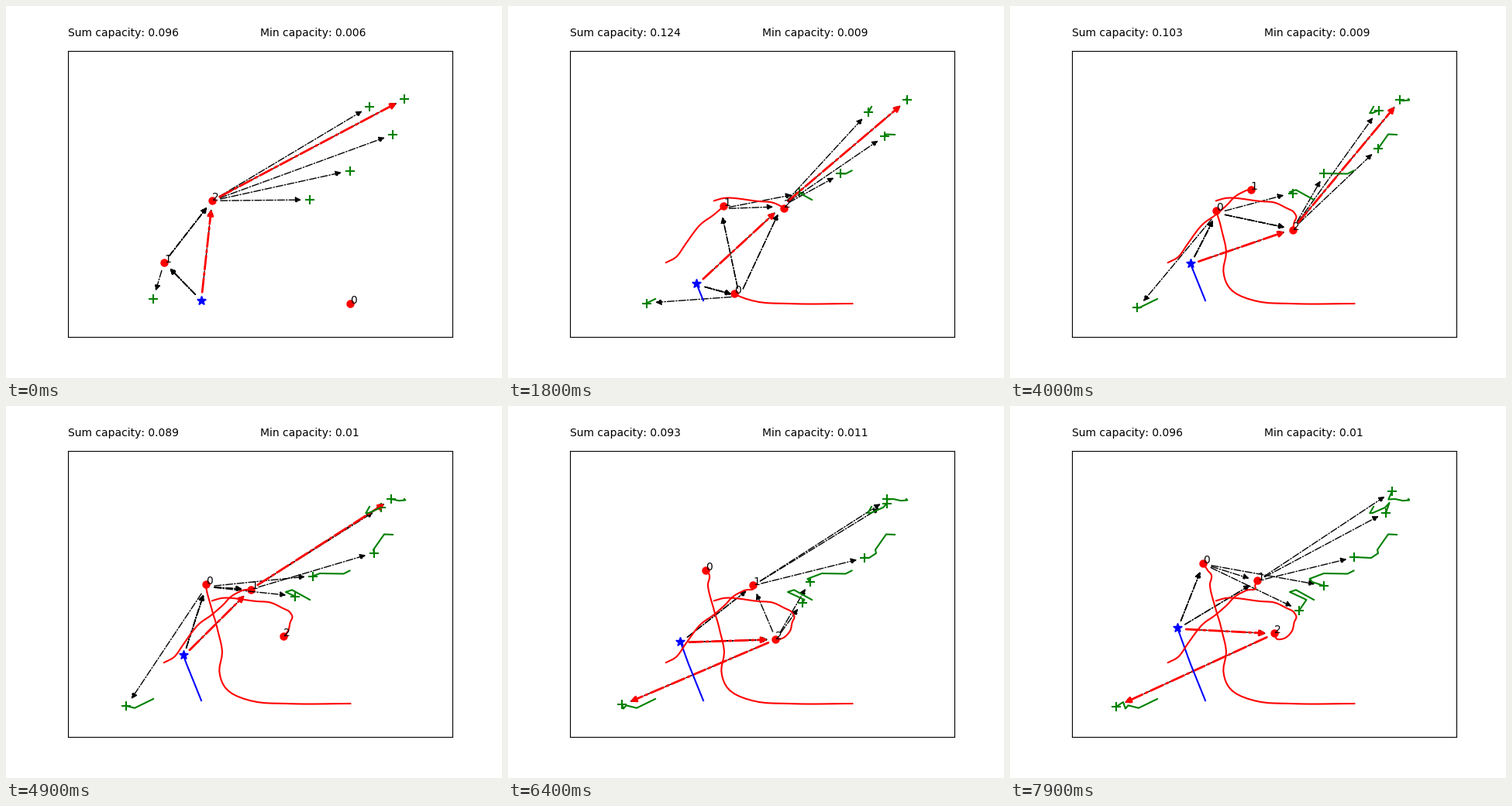
Write a matplotlib script that moves like this. It is 640 px wide and 480 px high and loops after 8 s.

```python
import numpy as np
import matplotlib.pyplot as plt
from matplotlib.animation import FuncAnimation
from matplotlib.patches import FancyArrowPatch

plt.rcParams["text.kerning_factor"] = 6

FRAMES, STEP_MS = 80, 100
T = np.arange(FRAMES)


def walk(*knots):
    """Straight legs between (time, x, y) waypoints."""
    t, x, y = np.array(knots, float).T
    return np.column_stack([np.interp(T, t, x), np.interp(T, t, y)])


def glide(*knots):
    """Cubic Hermite curve through (time, x, y) waypoints."""
    k = np.array(knots, float)
    t, p = k[:, 0], k[:, 1:]
    m = np.gradient(p, t, axis=0)
    i = np.clip(np.searchsorted(t, T, side="right") - 1, 0, len(t) - 2)
    h = (t[i + 1] - t[i])[:, None]
    u = (T - t[i])[:, None] / h
    ease = u * u * (3 - 2 * u)
    return (p[i] + ease * (p[i + 1] - p[i])
            + h * u * (1 - u) * ((1 - u) * m[i] - u * m[i + 1]))


# Pixels from the top left corner: base station, relays, users
paths = {
    "S": walk((0, 252, 380), (40, 232.6, 332), (79, 216, 286.3)),
    "0": glide((0, 444.3, 384), (10, 362.3, 384), (14, 324, 382), (18, 292, 371.3),
               (24, 275.3, 342), (28, 279, 317), (32, 273.2, 289.5), (40, 266, 264),
               (49, 258, 230.3), (53, 260, 222), (64, 255, 212), (79, 249, 203.3)),
    "1": glide((0, 204, 331), (3, 217.5, 323.5), (6, 228.5, 308), (10, 246, 284.3),
               (15, 266, 269), (18, 278.3, 258.3), (23, 288, 248), (32, 302, 239.3),
               (49, 316, 236.5), (64, 316.3, 231.3), (79, 319.3, 225.3)),
    "2": glide((0, 266, 251.3), (3, 279, 247.8), (10, 323, 252), (14, 341, 253.5),
               (18, 356.3, 260.5), (25, 367, 267), (28, 369.5, 272), (32, 367, 278.3),
               (40, 364.5, 289), (49, 358, 297.3), (64, 345.3, 301), (79, 341, 293.3)),
    "A": walk((0, 190, 378), (38, 166, 389.7), (51, 152.5, 386.3), (57, 149, 390.5),
              (68, 146, 382), (79, 137, 388)),
    "B": walk((0, 392, 250), (26, 369, 237.3), (36, 361, 240), (59, 382.5, 250),
              (79, 373, 264)),
    "C": walk((0, 443.5, 212.5), (12, 435.5, 216.5), (40, 405, 216),
              (58, 386.5, 223), (64, 390, 227), (79, 405, 232)),
    "D": walk((0, 499, 166), (14, 488, 165.5), (42, 474, 185.5), (49, 475, 190),
              (58, 466, 196), (79, 444, 195)),
    "E": walk((0, 469, 130), (20, 464.3, 138.3), (32, 468, 138), (49, 484, 131),
              (67, 489.5, 125), (79, 485, 138)),
    "F": walk((0, 514, 120), (20, 515.3, 121.5), (34, 507, 122.2), (49, 497, 120),
              (66, 488.3, 120.5), (79, 493, 110)),
}

# First step of a plan and its routes; the weakest route comes last
plans = [
    (0, "S1A S12B S12C S12D S12E S2F"),
    (6, "S1A S1B S12C S12D S02E S2F"),
    (14, "S0A S01B S012C S02D S02E S2F"),
    (25, "S0A S0B S02C S02D S02E S2F"),
    (41, "S0A S0B S0C S01D S01E S1F"),
    (57, "S2B S2C S21D S1E S1F S2A"),
    (72, "S0B S0C S01D S1E S1F S2A"),
]
key_t = [0, 10, 18, 32, 49, 64, 79]
total = np.interp(T, key_t, [.096, .1, .124, .116, .089, .093, .096])
least = np.interp(T, key_t, [.006, .008, .009, .009, .01, .011, .01])

fig, ax = plt.subplots(figsize=(6.4, 4.8), dpi=100)


def draw_route(route, i, color, width):
    for a, b in zip(route, route[1:]):
        ax.add_patch(FancyArrowPatch(
            paths[a][i], paths[b][i], arrowstyle="-|>", mutation_scale=11,
            shrinkA=7.8, shrinkB=7.8, linestyle="-.", color=color, lw=width, zorder=1))


def draw_node(name, i, color, marker, size):
    trail = paths[name][:i + 1]
    ax.plot(*trail.T, color=color, lw=1.5)
    ax.scatter(*trail[-1], s=size, c=color, marker=marker, lw=1.5)


def draw(i):
    ax.clear()
    ax.set(xlim=(80, 576), ylim=(427.2, 57.6), xticks=[], yticks=[])
    ax.text(0, 1.05, f"Sum capacity: {round(total[i], 3)}", transform=ax.transAxes)
    ax.text(.5, 1.05, f"Min capacity: {round(least[i], 3)}", transform=ax.transAxes)

    for name in "ABCDEF":
        draw_node(name, i, "g", "+", 70)
    draw_node("S", i, "b", "*", 60)
    for name in "012":
        draw_node(name, i, "r", "o", 36)
        ax.text(*paths[name][i], name)

    # Links lag one step behind the nodes
    routes = [names for start, names in plans if start <= i][-1].split()
    back = max(i - 1, 0)
    for route in routes:
        draw_route(route, back, "k", 1)
    draw_route(routes[-1], back, "r", 2)
    return []


anim = FuncAnimation(fig, draw, frames=FRAMES, interval=STEP_MS,
                     repeat=True, repeat_delay=0, blit=False)
plt.show()
```
